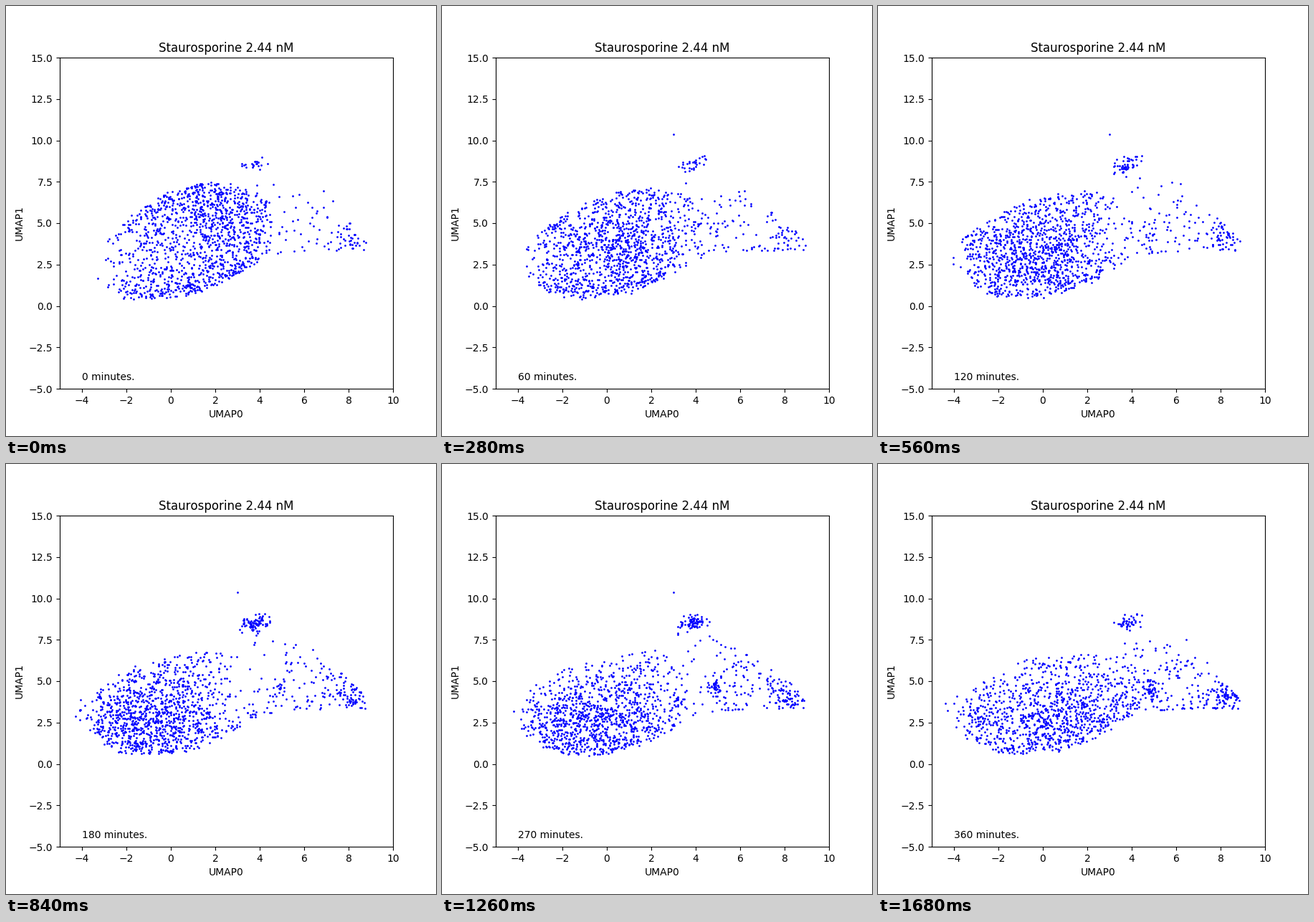
A matplotlib script that plays this animation: 600 by 600 pixels, repeating every 1.82 s.

```python
import numpy as np
import matplotlib.pyplot as plt
from matplotlib.animation import FuncAnimation

FRAMES, STEP_MS, STEP_MIN = 13, 140, 30

plt.rcParams["text.kerning_factor"] = 6


def fade(v):
    return 1 / (1 + np.exp(-v))


def spot(x, y, cx, cy, sx, sy):
    return np.exp(-((x - cx) / sx) ** 2 / 2 - ((y - cy) / sy) ** 2 / 2)


def sample(rng, n, x_range, low, high, density):
    """Pick n points between two curves, following a density."""
    x = rng.uniform(*x_range, 30000)
    y = rng.uniform(0, 8, x.size)
    lo, hi = low(x), high(x)
    inside = (lo < y) & (y < hi)
    x, y = x[inside], y[inside]
    h = (y - lo[inside]) / (hi - lo)[inside]
    w = density(x, y, h)
    pick = rng.choice(x.size, int(n), replace=False, p=w / w.sum())
    return np.column_stack([x[pick], y[pick]])


def body(rng, u):
    """Main population: its core drifts left, then back to the lower right."""
    early = np.exp(-5 * u)
    core_x = 2.3 - 12.6 * u + 11.6 * u ** 2
    core_y = 2.5 + 2.5 * early
    left = -3.7 + 1.5 * early
    right = 3.0 + 0.65 * core_x

    def low(x):
        d = x + 0.85
        return 0.6 - 0.15 * early + np.where(d < 0, 0.06 * abs(d) ** 3, 0.1 * d ** 2)

    def high(x):
        return 6.75 + 0.65 * early - (0.08 + 0.075 * early) * (x - 1.8) ** 2

    def density(x, y, h):
        sides = fade((x - left) / 0.3) * fade((right - x) / 0.4)
        thin = 1 - 0.65 * (1 - early) * h ** 2
        rim = 1.5 * early * abs(2 * h - 1) ** 3
        return sides * (thin + rim + spot(x, y, core_x, core_y, 1.4, 1.1)) + 0.03

    pts = sample(rng, 1260 - 220 * u, (-4.3, 4.5), low, high, density)
    return pts + rng.normal(0, 0.07, pts.shape)


def wing(rng, u):
    """Sparse bridge to the right, with a dense tip and a growing knot."""
    def density(x, y, h):
        tip = 2.5 * spot(x, y, 8.2, 4.1, 0.45, 0.5)
        knot = 6 * u * spot(x, y, 4.85, 4.5, 0.15, 0.28)
        return 0.4 + tip + knot + np.exp(-h / 0.04)

    return sample(rng, 90 + 170 * u, (2.8, 8.95),
                  lambda x: 3.35 - 0.4 * np.exp(4 - x),
                  lambda x: 6.4 - 0.3 * (x - 6) ** 2, density)


def island(rng, u):
    n = int(20 + 70 * np.exp(-((u - 0.65) / 0.33) ** 2))
    x = np.clip(rng.normal(3.85, 0.33, n), 3.2, 4.6)
    y = 8.55 + 0.3 * (x - 3.85) + rng.normal(0, 0.22, n)
    return np.column_stack([x, np.clip(y, 7.8, 9.05)])


def strays(rng, u):
    """Loose points between the island and the wing."""
    t = rng.uniform(0, 1, int(8 + 14 * u))
    arc = np.column_stack([3.6 + 3.2 * t, 7.4 - 1.1 * t])
    return arc + rng.normal(0, 0.45, arc.shape)


def points(step):
    rng = np.random.default_rng(100 + step)
    u = step / (FRAMES - 1)
    parts = [part(rng, u) for part in (body, wing, island, strays)]
    if 2 <= step < FRAMES - 1:
        parts.append([(3.0, 10.36)])
    return np.vstack(parts)


fig, ax = plt.subplots(figsize=(6, 6), dpi=100)
ax.set(xlim=(-5, 10), ylim=(-5, 15), xlabel="UMAP0", ylabel="UMAP1",
       title="Staurosporine 2.44 nM")
ax.set_xticks(range(-4, 11, 2))
dots = ax.scatter([], [], s=1, c="blue")
label = ax.text(-4, -4.5, "")


def update(step):
    dots.set_offsets(points(step))
    label.set_text(f"{step * STEP_MIN} minutes.")
    return dots, label


anim = FuncAnimation(fig, update, frames=FRAMES, interval=STEP_MS,
                     repeat=True, repeat_delay=0)
plt.show()
```
